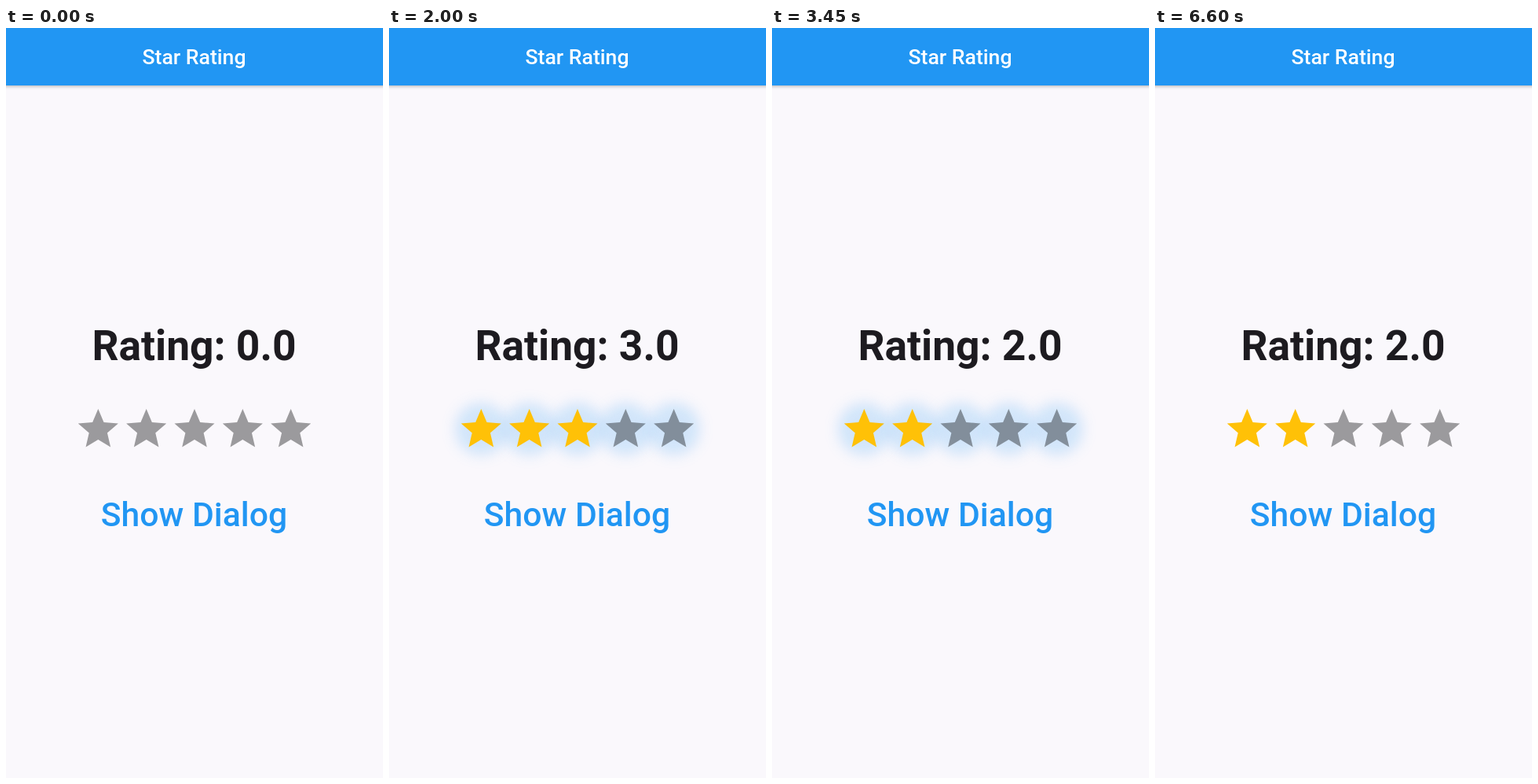
These frames come from a looping animation (480x953 px, 8000 ms). An HTML page:

```html
<!DOCTYPE html>
<html lang="en">
<head>
<meta charset="utf-8">
<title>Star Rating</title>
<style>
  html, body { margin: 0; width: 100%; height: 100%; overflow: hidden; background: #faf8fc; }
  svg { display: block; width: 480px; height: 953px; }
  text { font-family: Roboto, sans-serif; font-weight: 500; text-anchor: middle; }
  .bar { fill: #2196f3; filter: drop-shadow(0 1.5px 2px rgba(0, 0, 0, .3)); }
  .title { font-size: 26.67px; fill: #fff; }
  .rating { font-size: 53.33px; font-weight: 700; fill: #1d1b20; }
  .button { font-size: 42.67px; fill: #2196f3; }
  .glow { fill: #2196f3; fill-opacity: .187; filter: blur(8.4px); }
</style>
</head>
<body>
<svg viewBox="0 0 480 953">
  <rect class="bar" x="-10" y="-10" width="500" height="83"/>
  <text class="title" x="239.5" y="46">Star Rating</text>
  <text class="rating" id="rating" x="239.5" y="422">Rating: 0.0</text>
  <g id="stars"></g>
  <text class="button" x="239.5" y="633">Show Dialog</text>
</svg>
<script>
const LOOP = 8000, SIZE = 61.33;
const STAR = 'M12 17.27L18.18 21l-1.64-7.03L22 9.24l-7.19-.61L12 2 9.19 8.63 2 9.24l5.46 4.73L5.82 21z';

// [start in ms, rating]: one drag across the row, then three taps
const RATINGS = [
  [0, 0], [950, 1], [1800, 2], [1950, 3], [2150, 4], [2300, 5],
  [2500, 4], [2650, 3], [2950, 2], [4800, 4], [5700, 5], [6450, 2]
];
const DRAG = [950, 3500];

const label = document.getElementById('rating');
const row = document.getElementById('stars');

function add(tag, attributes) {
  const node = document.createElementNS('http://www.w3.org/2000/svg', tag);
  for (const key in attributes) node.setAttribute(key, attributes[key]);
  return row.appendChild(node);
}

const stars = Array.from({ length: 5 }, (_, i) => {
  const x = 240 + (i - 2) * SIZE, y = 509.5;
  return {
    glow: add('circle', { class: 'glow', cx: x, cy: y, r: SIZE / 2 + 2.67 }),
    shape: add('path', {
      d: STAR,
      transform: `translate(${x - SIZE / 2} ${y - SIZE / 2}) scale(${SIZE / 24})`
    })
  };
});

function draw(now) {
  const t = now % LOOP;
  const rating = RATINGS.filter(([start]) => start <= t).pop()[1];
  const dragging = t >= DRAG[0] && t < DRAG[1];

  label.textContent = `Rating: ${rating.toFixed(1)}`;
  stars.forEach(({ glow, shape }, i) => {
    glow.style.display = dragging ? '' : 'none';
    shape.style.fill = i < rating ? '#ffc107' : 'rgba(0, 0, 0, .38)';
  });
}

function tick() {
  draw(performance.now());
  requestAnimationFrame(tick);
}
tick();
</script>
</body>
</html>
```
